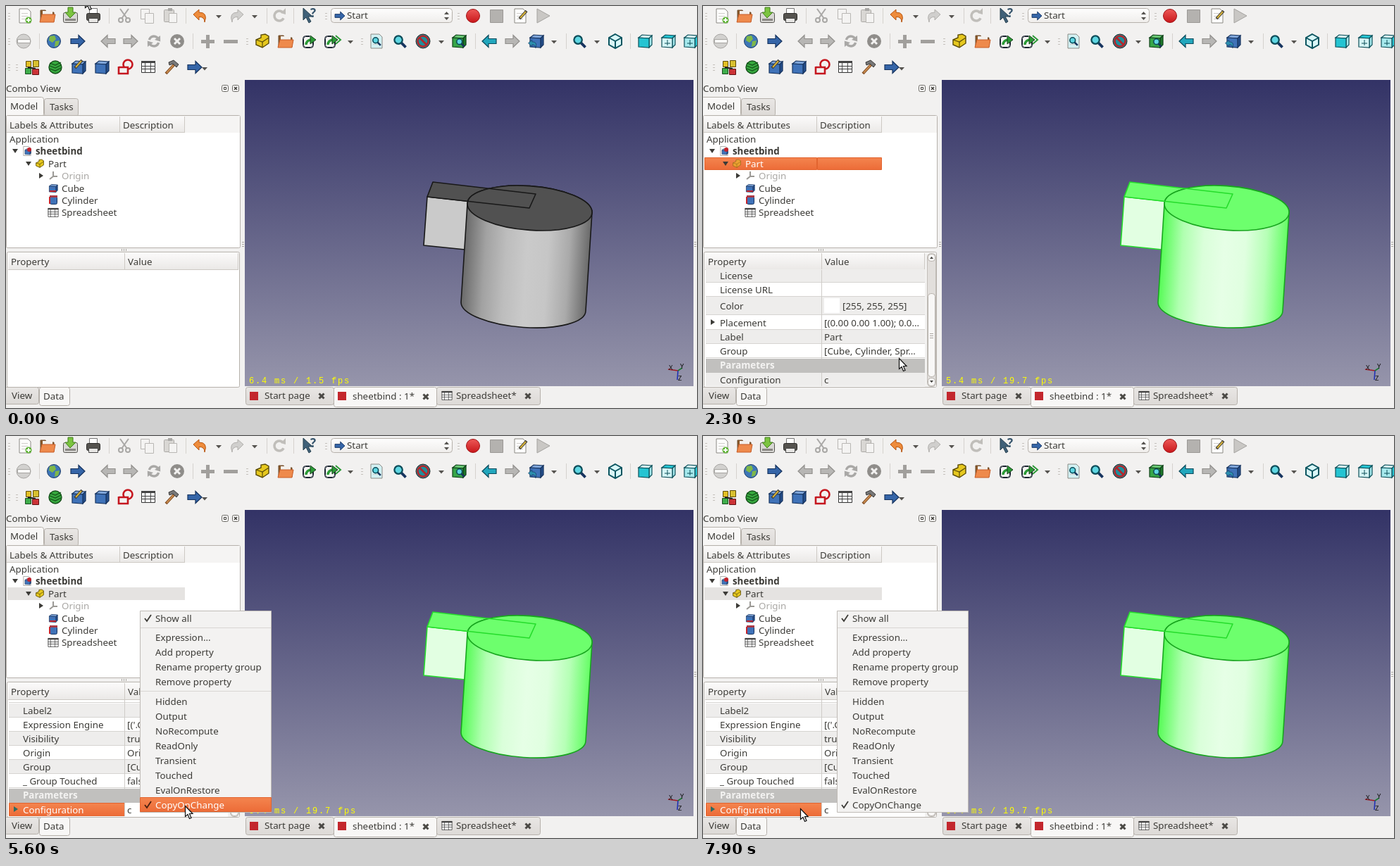
An HTML page with a canvas that plays this animation: 981x571 px, repeating every 8 s.

```html
<!DOCTYPE html>
<html lang="en">
<head>
<meta charset="utf-8">
<title>Property menu</title>
<style>
html, body { margin: 0; width: 100%; height: 100%; overflow: hidden; background: #f2f1f0; }
canvas { display: block; }
</style>
</head>
<body>
<canvas id="stage" width="981" height="571"></canvas>
<script>
const c = document.getElementById('stage').getContext('2d');
const LOOP = 8000, STEP = 100, TAU = Math.PI * 2;
const SANS = '"Noto Sans", "Open Sans", sans-serif';
const INK = '#3c3b37', EDGE = '#b6b1ab', TEAL = '#25c4d2', BLUE = '#3565a8', NAVY = '#17345f', GRAY = '#a9a8a6';

// Pointer path: time, x, y
const PATH = [
  [0, 112, -13], [300, 128, 90], [600, 82, 224], [1000, 82, 224], [1100, 104, 240],
  [1300, 278, 377], [1700, 334, 408], [2000, 318, 452], [2400, 264, 516], [2900, 264, 516],
  [3000, 180, 531], [3500, 180, 531], [3900, 232, 541], [4200, 232, 541], [4500, 174, 540],
  [4700, 174, 540], [4800, 190, 536], [5000, 190, 536], [5300, 380, 530], [5600, 254, 525],
  [5900, 367, 525], [6200, 289, 525], [6300, 289, 525], [6500, 298, 503], [6600, 290, 465],
  [6700, 284, 489], [6900, 290, 520], [7200, 381, 531], [7500, 270, 525], [7900, 138, 529]
];

function pointer(t) {
  const i = PATH.findIndex(k => k[0] > t);
  if (i < 0) return PATH[PATH.length - 1].slice(1);
  const [t0, x0, y0] = PATH[i - 1], [t1, x1, y1] = PATH[i], f = (t - t0) / (t1 - t0);
  return [Math.round(x0 + (x1 - x0) * f), Math.round(y0 + (y1 - y0) * f)];
}

// ---- drawing helpers ----
function paint(fill, stroke, w = 1) {
  if (fill) { c.fillStyle = fill; c.fill(); }
  if (stroke) { c.strokeStyle = stroke; c.lineWidth = w; c.stroke(); }
}
function rect(x, y, w, h, fill, stroke, r = 0) {
  c.beginPath();
  const o = stroke ? 0.5 : 0;
  c.roundRect(x + o, y + o, w - 2 * o, h - 2 * o, r);
  paint(fill, stroke);
}
function poly(p, fill, stroke, w, open) {
  c.beginPath();
  for (let i = 0; i < p.length; i += 2) c.lineTo(p[i], p[i + 1]);
  if (!open) c.closePath();
  paint(fill, stroke, w);
}
const line = (p, color, w = 1) => poly(p, null, color, w, true);
function disc(x, y, r, fill, stroke, w) {
  c.beginPath();
  c.arc(x, y, r, 0, TAU);
  paint(fill, stroke, w);
}
function curve(x, y, r, a, b, color, w) {
  c.beginPath();
  c.arc(x, y, r, a, b);
  paint(null, color, w);
}
function ramp(x0, y0, x1, y1, ...stops) {
  const g = c.createLinearGradient(x0, y0, x1, y1);
  stops.forEach((s, i) => g.addColorStop(i / (stops.length - 1), s));
  return g;
}
function text(s, x, y, color = INK, bold) {
  c.font = (bold ? 'bold ' : '') + '13.33px ' + SANS;
  c.fillStyle = color;
  c.fillText(s, x, Math.round(y) + 5);
}
function at(x, y, draw, scale = 1) {
  c.save();
  c.translate(x, y);
  c.scale(scale, scale);
  draw();
  c.restore();
}
const glow = (x, y, w, h) => rect(x, y, w, h, ramp(0, y, 0, y + h, '#f4854f', '#ec6b37'), '#e2642f');

// ---- icons ----
const drop = (x, y) => poly([x - 4, y - 1, x + 4, y - 1, x, y + 3.5], '#55534f');
const expander = (x, y, open, color = INK) =>
  poly(open ? [x - 4, y - 3, x + 4, y - 3, x, y + 3] : [x - 3, y - 4, x + 3, y, x - 3, y + 4], color);
function grip(x, y) { for (const d of [-4, 0, 4]) rect(x, y + d, 3, 1, '#c4c0bb'); }
const divider = (x, y) => rect(x, y - 11, 1, 22, '#d5d2ce');
const arrow = (x, y, dir, fill, edge, s = 1) => at(x, y, () => {
  c.scale(dir, 1);
  poly([-10, -3.5, 1, -3.5, 1, -8.5, 10, 0, 1, 8.5, 1, 3.5, -10, 3.5], fill, edge, 1.2);
}, s);
function cube(x, y, top, left, side, edge, s = 1) {
  at(x, y, () => {
    poly([-9, -5, -4, -9, 10, -8, 6, -4], top, edge, 1.2);
    poly([6, -4, 10, -8, 10, 5, 6, 9], side, edge, 1.2);
    poly([-9, -5, 6, -4, 6, 9, -9, 8], left, edge, 1.2);
  }, s);
}
const blueCube = (x, y, s) => cube(x, y, '#7fa6da', '#3f72b8', '#254f8c', NAVY, s);
function page(x, y, s = 1, fill = '#fdfdfc') {
  at(x, y, () => {
    poly([-8, -10, 4, -10, 8, -6, 8, 10, -8, 10], fill, '#8b8984');
    for (const d of [-4, 0, 4]) rect(-5, d, 9, 1, '#cfcdca');
  }, s);
}
function folder(x, y) {
  poly([x - 10, y - 8, x - 3, y - 8, x - 1, y - 5, x + 9, y - 5, x + 9, y + 8, x - 10, y + 8], '#8b5a2a', '#6d4a2a');
  rect(x - 7, y - 7, 14, 6, '#f3f0ec');
  poly([x - 8, y - 2, x + 11, y - 2, x + 9, y + 9, x - 11, y + 9], '#ee8a4c', '#c75d28');
}
function lens(x, y, s = 0.95) {
  at(x, y, () => {
    line([2, 2, 9, 9], NAVY, 4);
    disc(-2, -2, 6, '#5fd6e2', '#0b4b58', 2.4);
  }, s);
}
function reload(x, y) {
  for (const a of [0.3, 3.44]) {
    curve(x, y, 7, a, a + 2.2, GRAY, 3.5);
    at(x, y, () => { c.rotate(a + 2.2); poly([2, -1, 12, -1, 7, 6], GRAY); });
  }
}
function bend(x, y, dir, fill, edge, s) {
  at(x, y, () => {
    c.scale(dir, 1);
    c.beginPath();
    c.moveTo(-10, -2); c.lineTo(-2, -9); c.lineTo(-2, -5);
    c.quadraticCurveTo(11, -5, 6, 9);
    c.quadraticCurveTo(6, 1, -2, 1.5);
    c.lineTo(-2, 6);
    c.closePath();
    paint(fill, edge);
  }, s);
}
function partIcon(x, y, s) {
  at(x, y, () => {
    poly([-9, -2, -2, -5, -2, -9, 4, -10, 9, -7, 9, 3, 0, 9, -9, 5], '#e6c81e', '#5b4c08', 1.4);
    line([-9, -2, 0, 1, 9, -5], '#5b4c08', 1.2);
    line([0, 1, 0, 9], '#5b4c08', 1.2);
  }, s);
}
function link(x, y) {
  rect(x - 9, y - 8, 16, 18, '#f4f4f3', '#1b2430', 4);
  rect(x - 8, y - 7, 14, 16, null, '#1b2430', 3);
  rect(x + 1, y - 9, 8, 10, '#f2f1f0');
  curve(x + 3, y + 5, 7, Math.PI, Math.PI * 1.5, '#2b9a36', 3.5);
  poly([x + 2, y - 8, x + 10, y - 2, x + 2, y + 4], '#2b9a36', '#173f1b');
}
function sheet(x, y, s = 1) {
  at(x, y, () => {
    rect(-10, -8, 20, 17, '#fff', '#333');
    rect(-10, -8, 20, 3, '#444');
    for (const d of [-1, 3]) rect(-10, d, 20, 1, '#444');
    for (const d of [-5, 3]) rect(d, -8, 1, 17, '#444');
  }, s);
}
function pencil(x, y) {
  line([x - 3, y + 4, x + 7, y - 7], '#3b3a36', 4);
  line([x - 2, y + 3, x + 6, y - 6], '#d8b43a', 2);
}

function toolbars() {
  // first row
  let y = 14;
  for (const x of [3, 453, 641]) grip(x, y);
  for (const x of [146, 255, 370, 408]) divider(x, y);
  page(27, y); disc(32, 20, 4.5, '#5fb336'); line([32, 17, 32, 23], '#fff', 2); line([29, 20, 35, 20], '#fff', 2);
  folder(59, 14);
  rect(81, 9, 21, 15, '#d8d7d4', '#55534f', 2); rect(84, 18, 15, 3, '#8a8884');
  poly([88, 2, 95, 2, 95, 9, 99, 9, 91, 17, 84, 9, 88, 9], '#7cc440', '#3e7d1a');
  rect(118, 3, 12, 9, '#fff', '#777'); rect(114, 10, 20, 11, '#55534f', '#2d2c2a', 2); rect(117, 17, 14, 7, '#e8e7e5', '#444');
  line([162, 4, 172, 18], GRAY, 2); line([174, 4, 164, 18], GRAY, 2); disc(163, 20, 3, null, GRAY, 2); disc(173, 20, 3, null, GRAY, 2);
  for (const d of [0, 6]) rect(191 + d, 4 + d, 13, 15, '#f4f3f2', '#b9b7b4');
  rect(224, 5, 15, 18, '#d9d7d4', '#aaa8a5', 1); rect(230, 3, 6, 4, GRAY); rect(231, 10, 12, 14, '#f4f3f2', '#b9b7b4');
  bend(276, y, 1, '#ee8c3c', '#b85510'); drop(302, y);
  bend(327, y, -1, '#d0cfcd', '#b2b0ad'); drop(353, y);
  curve(388, y, 7, 0.5, 5.5, '#c0beba', 3.5); poly([390, 10, 397, 3, 397, 12], '#c0beba');
  poly([422, 3, 422, 20, 426, 16, 430, 24, 433, 22, 429, 15, 435, 15], '#3f6078', '#26404f');
  c.font = 'bold 17px ' + SANS; c.fillStyle = '#34536b'; c.fillText('?', 432, 16);
  rect(461, 3, 173, 21, ramp(0, 3, 0, 24, '#fefefe', '#efedeb'), EDGE, 4);
  arrow(474, y, 1, BLUE, NAVY, 0.7); text('Start', 484, 13);
  poly([622, 12, 629, 12, 625.5, 8], '#55534f'); poly([622, 16, 629, 16, 625.5, 20], '#55534f');
  disc(663, y, 9.5, ramp(0, 4, 0, 24, '#ee5a58', '#c8161a'), '#a01014');
  rect(687, 5, 19, 19, '#b4b2af', '#9a9895');
  page(730, y); pencil(732, 14);
  poly([754, 4, 772, 14, 754, 24], '#c9c7c4', '#a5a3a0');

  // second row
  y = 50;
  for (const x of [3, 341, 504]) grip(x, y);
  for (const x of [47, 265, 666, 795, 886]) divider(x, y);
  disc(25, y, 10, '#d2d1cf', '#a7a5a2'); rect(16, 47, 19, 6, '#f8f8f7', '#a7a5a2');
  disc(68, y, 9.5, '#3e76b8', '#1f3f68');
  poly([62, 43, 69, 42, 71, 47, 66, 52, 61, 49], '#7fb848'); poly([70, 50, 76, 49, 74, 56, 69, 58], '#7fb848');
  arrow(102, y, 1, BLUE, NAVY);
  arrow(145, y, -1, '#b7b6b4', '#92908d'); arrow(177, y, 1, '#b7b6b4', '#92908d');
  reload(210, y);
  disc(243, y, 10, '#8f8d8a'); line([239, 46, 247, 54], '#f2f1f0', 3); line([247, 46, 239, 54], '#f2f1f0', 3);
  rect(277, 48, 19, 5, '#a19f9c'); rect(284, 41, 5, 19, '#a19f9c'); rect(309, 48, 20, 5, '#a19f9c');
  partIcon(364, y); folder(397, 50);
  link(430, y); link(461, y); line([468, 42, 475, 48, 468, 54], '#2b9a36', 2); drop(489, y);
  page(526, y, 1, '#d3f1f3'); lens(526, 50, 0.65);
  lens(559, y);
  disc(592, y, 10, '#1f8f9c', '#262626', 1); disc(592, y, 7.5, null, '#b3262b', 2.6); line([587, 45, 597, 55], '#b3262b', 2.6);
  drop(618, y);
  cube(643, y, '#69c874', '#36a548', '#1d7a2c', '#0f4218'); lens(645, 52, 0.65);
  arrow(686, y, -1, '#22a7bd', '#0c4a5c'); arrow(719, y, 1, '#b7b6b4', '#92908d');
  blueCube(753, 50); bend(748, 54, 1, '#2c8fae', NAVY, 0.65); drop(778, y);
  lens(814, 50); drop(839, y);
  poly([865, 40, 874, 45, 874, 55, 865, 60, 856, 55, 856, 45], '#d9f7f8', '#0c5560', 2);
  for (const p of [[856, 45], [874, 45], [865, 60]]) line([865, 50, ...p], '#0c5560', 2);
  cube(907, y, '#d5f5f6', TEAL, '#a6e9ed', '#0c4f59');
  cube(940, y, TEAL, '#d5f5f6', '#a6e9ed', '#0c4f59');
  cube(972, y, '#d5f5f6', '#a6e9ed', TEAL, '#0c4f59');
  for (const x of [939, 971]) { line([x, 48, x, 56], '#0c4f59'); line([x - 4, 53, x + 4, 53], '#0c4f59'); }

  // third row
  y = 87;
  grip(3, y); grip(14, y);
  rect(28, 78, 8, 9, '#e3bf25', '#5c4a08'); rect(38, 77, 9, 10, '#d8c030', '#5c4a08');
  rect(27, 88, 9, 9, '#3fae4b', '#174b1d'); rect(37, 89, 10, 9, '#cc3438', '#5e1012'); line([31, 87, 42, 89], '#222', 2);
  disc(70, y, 9, '#37a93f', '#145019', 1.4);
  for (const d of [-4, 0, 4]) line([62, 85 + d, 70, 88 + d, 78, 84 + d], '#145019', 1.3);
  blueCube(103, y); pencil(101, 84);
  blueCube(136, y);
  disc(173, 83, 6.5, null, '#c5171f', 2.6); rect(160, 87, 13, 10, '#f2f1f0'); line([160, 87, 173, 87, 173, 96, 160, 96, 160, 86], '#c5171f', 2.6);
  sheet(202, 86);
  line([227, 96, 239, 83], '#7d4a20', 4); line([228, 95, 238, 84], '#c98a4d', 2);
  poly([231, 80, 238, 77, 245, 83, 242, 87, 237, 82, 232, 84], '#777', '#3b3b3b');
  arrow(268, y, 1, BLUE, NAVY); drop(282, 88);
}

function tab(x, y, w, h, label, tx, on) {
  rect(x, y, w, h, on ? '#f8f7f6' : ramp(0, y, 0, y + h, '#e9e7e5', '#dcd9d6'), EDGE, 3);
  text(label, tx, y + (on ? 13 : 12));
}
function header(x, y, w, h, label) {
  rect(x, y, w, h, ramp(0, y, 0, y + h, '#fbfafa', '#eae8e6'));
  rect(x + w - 1, y, 1, h, '#cdc9c4');
  rect(x, y + h - 1, w, 1, '#cdc9c4');
  text(label, x + 4, y + 12);
}

function tree(t) {
  text('Combo View', 0, 117);
  for (const x of [306, 321]) rect(x, 112, 10, 10, '#f8f7f6', '#6b6964', 2);
  rect(309, 115, 4, 4, null, INK);
  line([324, 115, 328, 119], INK, 1.4); line([328, 115, 324, 119], INK, 1.4);
  tab(-3, 129, 57, 28, 'Model', 6, true);
  tab(54, 131, 49, 26, 'Tasks', 62);
  rect(0, 155, 333, 189, '#fff', EDGE, 2);
  rect(1, 156, 331, 24, '#f5f4f3');
  header(1, 157, 161, 23, 'Labels & Attributes');
  header(162, 157, 92, 23, 'Description');
  const picked = t >= 900 && t < 3400;
  if (picked) { glow(2, 215, 160, 18); glow(162, 215, 92, 18); }
  else if (t >= 3400) rect(2, 215, 252, 18, '#e5e3e1');
  text('Application', 5, 189);
  expander(13, 206, true); expander(32, 224, true); expander(50, 241, false);
  page(30, 206, 0.65); blueCube(31, 207, 0.45); disc(33, 204, 3, '#c4242c');
  text('sheetbind', 42, 206, INK, true);
  c.globalAlpha = picked ? 0.5 : 1;
  partIcon(48, 224, 0.6);
  c.globalAlpha = 1;
  text('Part', 60, 224, picked ? '#fff' : INK);
  line([67, 235, 67, 242, 73, 242], '#9b9995', 2); line([67, 242, 62, 246], '#9b9995', 2);
  text('Origin', 79, 241, '#aaa8a5');
  blueCube(67, 259, 0.62); rect(62, 262, 9, 2, '#c4242c');
  text('Cube', 79, 259);
  rect(62, 270, 11, 12, '#3f72b8', NAVY, 2); rect(62, 269, 11, 3, '#a83a48'); rect(61, 271, 2, 10, '#c4242c');
  text('Cylinder', 79, 276);
  sheet(67, 293, 0.75);
  text('Spreadsheet', 79, 293);
}

// Rows: [label, value, centre, height]
const SHORT = [
  ['License', '', 383, 19], ['License URL', '', 403, 20], ['Color', '[255, 255, 255]', 426, 26],
  ['Placement', '[(0.00 0.00 1.00); 0.0…', 450, 20], ['Label', 'Part', 470, 20], ['Group', '[Cube, Cylinder, Spr…', 490, 20]
];
const FULL = ['Label2|', "Expression Engine|[('.Configuration', …", 'Visibility|true', 'Origin|Origin',
  'Group|[Cube, Cylinder, Spr…', '_ Group Touched|false'].map((s, i) => [...s.split('|'), 389.5 + i * 20.1, 20]);

function properties(t) {
  for (const d of [-3, 0, 3]) rect(167 + d, 345, 1, 3, '#a5a29e');
  rect(1, 349, 331, 193, '#fff', EDGE, 2);
  const filled = t >= 1000, all = t >= 4300, w = filled ? 311 : 326;
  header(3, 351, 166, 24, 'Property');
  header(169, 351, w - 165, 24, 'Value');
  if (filled) {
    (all ? FULL : SHORT).forEach(([label, value, y, h], i) => {
      const top = Math.round(y - h / 2), color = label === 'Color';
      rect(4, top, w, h, i % 2 ? '#fff' : '#eeedec');
      rect(4, top + h - 1, w, 1, '#d6d4d1');
      text(label, 24, y);
      if (color) rect(172, top + 2, 22, 21, '#fff');
      text(value, color ? 198 : 172, y);
    });
    if (all) rect(4, 378, w, 1, '#d6d4d1');
    else expander(14, 449, false);
    rect(168, 375, 1, 126, '#cfccc8');
    rect(4, 501, w, 20, '#c1c0be');
    text('Parameters', 24, 510, '#f4f3f2', true);
    const active = t >= 3400;
    rect(4, 521, w, 19, active ? '#fff' : '#eeedec');
    if (active) glow(4, 521, 165, 19);
    rect(168, 521, 1, 19, '#cfccc8');
    text('Configuration', 24, 531, active ? '#fff' : INK);
    text('c', 172, 531);
    if (all) expander(14, 530, false, '#2f6c62');
    rect(315, 351, 16, 190, '#f2f1f0');
    rect(318, 351, 13, 190, '#e2dfdc', '#c2beb9', 5);
    const top = all ? 443 : 408;
    rect(319, top, 11, 527 - top, '#f8f7f6', EDGE, 4);
    for (const d of [-3, 0, 3]) rect(322, Math.round((top + 527) / 2) + d, 5, 1, '#aaa6a1');
    rect(319, 352, 11, 11, '#f8f7f6', EDGE, 4); rect(319, 528, 11, 12, '#f8f7f6', EDGE, 4);
    poly([322, 359, 327, 359, 324.5, 356], INK); poly([322, 532, 327, 532, 324.5, 535], INK);
  }
  tab(-3, 541, 50, 25, 'View', 8);
  tab(47, 541, 44, 27, 'Data', 53, true);
}

// ---- 3D view ----
function ring(cx, cy, ry, a = 0, b = TAU) {
  c.save();
  c.transform(88.5, 6, 0, ry, cx, cy);
  c.arc(0, 0, 1, a, b);
  c.restore();
}
const lid = () => { c.beginPath(); ring(743.5, 287, 31.4); };
const base = () => { c.beginPath(); ring(734.5, 427, 29.5); };
function barrel() {
  c.beginPath();
  ring(743.5, 287, 31.4, Math.PI, TAU);
  ring(734.5, 427, 29.5, 0, Math.PI);
  c.closePath();
}
// Shading runs across the tilted side wall
const wall = shades => ramp(650, 357, 828, 368, ...shades);
const TOP = [598, 271, 606, 250, 752, 267, 743, 287], FRONT = [598, 271, 743, 287, 740, 355, 593, 340];
const FLOOR = [593, 340, 603, 321, 749, 335, 740, 355];

function solid(top, front, shades, boxEdge, tubeEdge) {
  poly(FRONT, front, boxEdge, 1.6);
  poly(TOP, top);
  barrel(); paint(wall(shades), tubeEdge, 1.6);
  lid(); paint(top, tubeEdge, 1.6);
  poly(TOP, null, boxEdge, 1.6);
}
function glass() {
  const Y = '#f4f41c';
  poly(FRONT, '#dddd45'); poly(TOP, '#8f9f22');
  poly([598, 271, 606, 250, 603, 321, 593, 340], '#b2b63c');
  barrel(); paint(wall(['#757c33', '#b0b33c', '#d6d845', '#e0e049', '#c9cd45', '#8c943c', '#445038']));
  base(); paint('rgba(150,155,64,.65)');
  lid(); paint('#82981f');
  c.save();
  barrel(); c.clip();
  poly(FRONT, 'rgba(205,198,36,.5)'); poly(TOP, 'rgba(112,106,18,.6)');
  poly([743, 287, 752, 267, 749, 335, 740, 355], 'rgba(120,118,24,.6)');
  c.restore();
  poly(FLOOR, 'rgba(160,160,60,.55)', 'rgba(205,194,36,.6)', 1);
  line([606, 250, 603, 321], '#c9c628');
  line([655, 278, 598, 271, 593, 340, 652, 346], Y, 1.3);
  line([598, 271, 606, 250, 688, 260], Y, 1.3);
  barrel(); paint(null, Y, 1.3);
  lid(); paint(null, Y, 1.3);
  for (const [x, y] of [[598, 271], [606, 250], [593, 340]]) disc(x, y, 1.8, Y);
}

function view(t) {
  rect(339, 105, 637, 435, ramp(0, 106, 0, 540, '#333366', '#9695ab'));
  c.lineJoin = 'round';
  if (t < 1000) solid('#515151', '#cacaca', ['#6a6a6a', '#a2a2a2', '#bdbdbd', '#cacaca', '#c6c6c6', '#aaaaaa', '#686868'], '#181818', '#181818');
  else if (t < 1100) glass();
  else solid('#6dff6d', '#e2ffe2', ['#56fb56', '#b0ffb0', '#daffda', '#e6ffe6', '#e0ffe0', '#b6ffb6', '#62fd62'], '#25dc2b', '#17a51e');
  c.lineJoin = 'miter';
  c.font = '12px "Liberation Mono", "DejaVu Sans Mono", monospace';
  c.fillStyle = '#ffff00';
  c.letterSpacing = '1.8px';
  c.fillText(t < 1000 ? '6.4 ms / 1.5 fps' : t < 1100 ? '5.5 ms / 0.1 fps' : '5.4 ms / 19.7 fps', 345, 536);
  c.letterSpacing = '0px';
  line([954, 518, 940, 516], '#a01a24', 1.6); line([954, 518, 953, 531], '#2031b4', 1.6); line([954, 518, 960, 514], '#1c7a34', 1.6);
  c.font = '9.5px ' + SANS; c.fillStyle = '#111';
  c.fillText('X', 941, 517); c.fillText('Y', 957, 515); c.fillText('Z', 954, 532);
  for (const x of [335, 977]) for (const d of [-3, 0, 3]) rect(x, 338 + d, 3, 1, '#aaa6a1');
}

function documents() {
  [['Start page', 340, 126, 367, 448], ['sheetbind : 1*', 465, 147, 492, 596], ['Spreadsheet*', 611, 148, 639, 741]].forEach(([s, x, w, tx, cross], i) => {
    const on = i === 1, d = 3.5, y = on ? 555 : 554;
    tab(x, 541, w, on ? 29 : 26, s, tx, on);
    if (i < 2) rect(tx - 21, 548, 12, 12, '#c3272d');
    else sheet(626, 553, 0.75);
    line([cross - d, y - d, cross + d, y + d], '#4b4945', 3); line([cross + d, y - d, cross - d, y + d], '#4b4945', 3);
  });
}

// ---- menus and pointer ----
function menu(x, y, w, h, tx, items, seps, ticked, [px, py]) {
  rect(x, y, w, h, '#f3f2f1', '#bfbbb6');
  for (const s of seps) rect(x + 1, s, w - 2, 1, '#d9d6d3');
  for (const [label, cy] of items) {
    const hot = px > x && px < x + w - 1 && Math.abs(py - cy) <= 10;
    if (hot) glow(x, cy - 11, w, 21);
    text(label, tx, cy, hot ? '#fff' : INK);
    if (ticked.includes(label)) line([x + 7, cy, x + 10, cy + 4, x + 16, cy - 5], hot ? '#4a2010' : INK, 1.8);
  }
}
const spread = (names, y) => names.split(' / ').map((s, i) => [s, y + i * 21]);
const ITEMS = [['Show all', 259], ...spread('Expression... / Add property / Rename property group / Remove property', 286),
  ...spread('Hidden / Output / NoRecompute / ReadOnly / Transient / Touched / EvalOnRestore / CopyOnChange', 377)];

function menus(t, p) {
  if (t >= 3400 && t < 4200) menu(181, 532, 115, 60, 204, [['Show all', 543], ['Expression...', 570]], [556], [], p);
  if (t >= 4900) menu(190, 248, 187, 287, 212, ITEMS, [272, 362], ['Show all', 'CopyOnChange'], p);
}

function frame(now) {
  const t = Math.floor((now % LOOP) / STEP) * STEP, p = pointer(t);
  rect(0, 0, 981, 571, '#f2f1f0');
  toolbars();
  tree(t);
  properties(t);
  view(t);
  documents();
  menus(t, p);
  at(p[0] + 0.5, p[1] + 0.5, () => poly([0, 0, 0, 15, 3.5, 12, 6, 18, 8.5, 17, 6, 11, 10.5, 11], '#fff', '#111', 1.2));
}

const start = performance.now();
function tick() {
  frame(performance.now() - start);
  requestAnimationFrame(tick);
}
tick();
</script>
</body>
</html>
```
